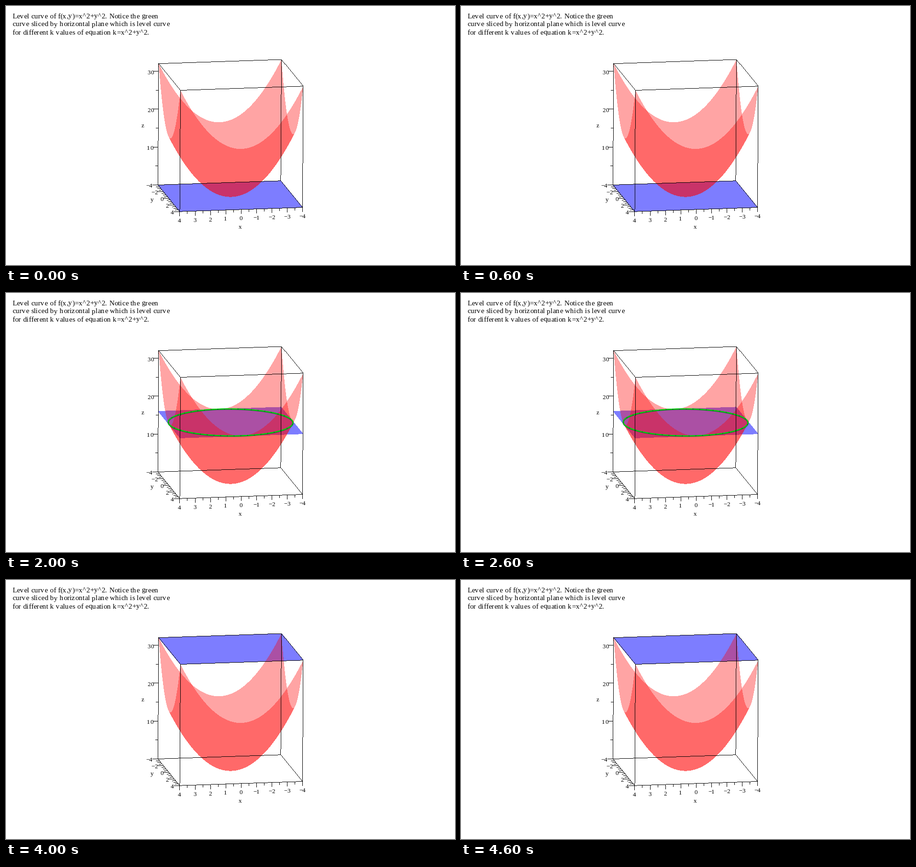
Recreate the animation shown at these times as a matplotlib script. Size 938 by 542 pixels, loop 5 s.

```python
import itertools

import numpy as np
import matplotlib.pyplot as plt
from matplotlib.animation import FuncAnimation
from matplotlib.textpath import TextPath

W, H, DPI = 938, 542, 100
PX = 72 / DPI
FONT = "Liberation Serif"
LEVELS = [0, 8, 16, 24, 32]
CURVE_COLORS = ["#62b800", "#62b800", "#0be00b", "#0be00b", "#0be00b"]

# Screen pixel = ORIGIN + AXES @ (x, y) + UP * z
ORIGIN = np.array([467.95, 397.5])
AXES = np.array([[-32.06, 5.69], [1.08, 6.97]])
UP = np.array([0.047, -7.93])


def project(x, y, z):
    base = ORIGIN[:, None] + AXES @ np.array([np.ravel(x), np.ravel(y)])
    return base + UP[:, None] * z


def point(x, y, z):
    return project(x, y, z)[:, 0]


def surface_image(alpha=0.36):
    """Count how often each pixel's view ray meets z = x^2 + y^2."""
    rows, cols = np.mgrid[0:H, 0:W]
    inv = np.linalg.inv(AXES)
    p = inv @ np.array([cols.ravel() - ORIGIN[0], rows.ravel() - ORIGIN[1]])
    q = -inv @ UP
    a = q @ q
    b = 2 * q @ p - 1
    disc = b * b - 4 * a * (p * p).sum(axis=0)
    root = np.sqrt(np.maximum(disc, 0))
    layers = np.zeros(W * H)
    for sign in (-1, 1):
        z = (-b + sign * root) / (2 * a)
        xy = p + q[:, None] * z
        layers += (disc >= 0) & (np.abs(xy) <= 4).all(axis=0)
    img = np.zeros((H, W, 4))
    img[..., 0] = 1
    img[..., 3] = (1 - (1 - alpha) ** layers).reshape(H, W)
    return img


fig = plt.figure(figsize=(W / DPI, H / DPI), dpi=DPI, facecolor="white")
ax = fig.add_axes([0, 0, 1, 1])
ax.axis("off")
ink = np.zeros((H, W, 4))
advances = {}


def line(p, q):
    """Draw a crisp one-pixel black line into the ink layer."""
    n = int(np.ceil(max(abs(np.subtract(q, p))))) + 1
    cols, rows = (np.rint(np.linspace(u, v, n)).astype(int)
                  for u, v in zip(p, q))
    ink[rows, cols, 3] = 1


def advance(ch, size):
    """Glyph advance rounded to whole pixels, as hinted screen fonts do."""
    if ch not in advances:
        ends = [TextPath((0, 0), s, size=100, prop={"family": FONT})
                .get_extents().x1 for s in (f"|{ch}|", "||")]
        advances[ch] = (ends[0] - ends[1]) / 100
    return int(advances[ch] * size + 0.55)


def label(x, y, s, align=0.5, size=13):
    steps = [advance(ch, size) for ch in s]
    x = round(x - align * sum(steps)) - 0.4
    for ch, step in zip(s, steps):
        if ch != " ":
            ax.text(x, y, ch, family=FONT, fontsize=size * PX, ha="left",
                    va="baseline", color="black", zorder=6)
        x += step


def number(n):
    return str(n).replace("-", "\u2212")


def draw_box():
    corners = list(itertools.product((-4, 4), (-4, 4), (0, 32)))
    for c, d in itertools.combinations(corners, 2):
        if sum(u != v for u, v in zip(c, d)) == 1:
            line(point(*c), point(*d))


def draw_ticks():
    for z in range(5, 31, 5):
        p = point(4, -4, z)
        major = z % 10 == 0
        line(p, p - [10 if major else 5, 0])
        if major:
            label(p[0] - 9, p[1] + 6, number(z), 1)
    for i in range(17):
        v = i / 2 - 4
        p = point(4, v, 0)
        major = i % 4 == 0
        line(p, p + [-11 if major else -6.5, 0.3])
        if major:
            label(p[0] - 11, p[1] + 6, number(int(v)), 1)
        p = point(v, 4, 0)
        major = i % 2 == 0
        line(p, p + [0, 9 if major else 5])
        if major:
            label(p[0], p[1] + 22.5, number(int(v)))
    for x, y, s in [(490, 465, "x"), (305, 409, "y"), (286, 254, "z")]:
        label(x, y, s)


def draw_caption():
    lines = [
        "Level curve of f(x,y)=x^2+y^2. Notice the green",
        "curve sliced by horizontal plane which is level curve",
        "for different k values of equation k=x^2+y^2.",
    ]
    for i, s in enumerate(lines):
        label(13, 25 + 17 * i, s, 0, 15)


draw_box()
draw_ticks()
draw_caption()
ax.imshow(surface_image(), interpolation="nearest", zorder=2)
ax.imshow(ink, interpolation="nearest", zorder=5)
ax.set_xlim(-0.5, W - 0.5)
ax.set_ylim(H - 0.5, -0.5)
ax.set_aspect("auto")

plane, = ax.fill([0, 1, 1, 0], [0, 0, 1, 1], facecolor=(0, 0, 1, 0.51),
                 edgecolor="none", lw=0, antialiased=False, zorder=1)
shade, = ax.plot([], [], color="#0a6e28", lw=3 * PX,
                 solid_capstyle="butt", zorder=3)
shine, = ax.plot([], [], lw=1.8 * PX, zorder=4, dashes=(7, 0.8),
                 dash_capstyle="butt")


def level_curve(k):
    t = np.linspace(0, 2 * np.pi, 721)
    x, y = np.sqrt(k) * np.cos(t), np.sqrt(k) * np.sin(t)
    curve = project(x, y, k)
    curve[:, np.maximum(abs(x), abs(y)) > 4.01] = np.nan
    return curve if 0 < k < 32 else curve[:, :0]


def update(i):
    k = LEVELS[i]
    plane.set_xy(project([4, -4, -4, 4], [-4, -4, 4, 4], k).T)
    cx, cy = level_curve(k)
    shade.set_data(cx, cy)
    shine.set_data(cx, cy - 0.5)
    shine.set_color(CURVE_COLORS[i])
    return plane, shade, shine


anim = FuncAnimation(fig, update, frames=len(LEVELS), interval=1000,
                     repeat=True, blit=False)
plt.show()
```
